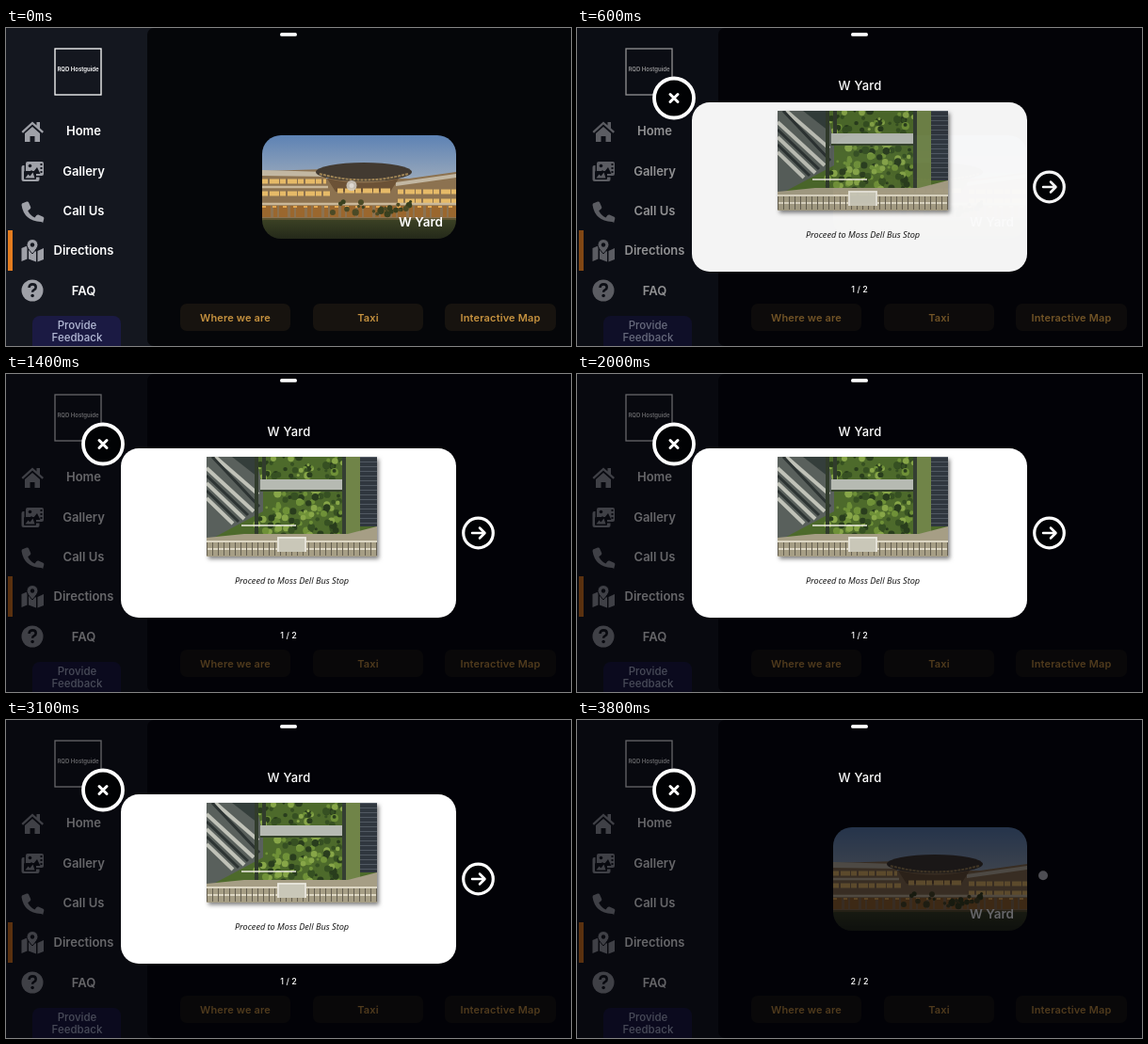
Animation of 600x338 px, one loop 3900 ms. Source, as an HTML page:

```html
<!DOCTYPE html>
<html lang="en">
<head>
<meta charset="utf-8">
<title>Directions</title>
<style>
html, body { margin: 0; width: 100%; height: 100%; overflow: hidden; background: #050609; }
svg { display: block; width: 600px; height: 338px; }
text { font-family: Inter, "Open Sans", sans-serif; text-anchor: middle; fill: #fff; }
.nav text { font-size: 13px; font-weight: 600; }
.icons { fill: #9fa1a8; }
.hole { fill: #14171f; }
.feedback text { font-size: 11.5px; font-weight: 500; fill: #b4bad6; }
.tabs rect { fill: #17130f; }
.tabs text { font-size: 11px; font-weight: 600; letter-spacing: .15px; fill: #c6923f; }
.name { font-size: 13.5px; font-weight: 600; }
.title { font-size: 13px; font-weight: 500; letter-spacing: .2px; }
.count { font-size: 9px; font-weight: 500; }
.caption { font: italic 9.2px "Open Sans", "Noto Sans", sans-serif; fill: #111; }
.ring { fill: #010204; stroke: #fff; }
.glyph { fill: none; stroke: #fff; stroke-linecap: round; stroke-linejoin: round; }

.dim, .box, .slide, .first, .second, .tap, .tap2 { animation: 3.9s linear infinite both; }
.dim { animation-name: dim; }
.box { animation-name: box; }
.slide { animation-name: slide; }
.first { animation-name: first; }
.second { animation-name: second; }
.tap { animation-name: tap; }
.tap2 { animation-name: tap2; }
@keyframes dim { 0%, 11% { opacity: 0 } 15.38% { opacity: .72 } 20%, 100% { opacity: 1 } }
@keyframes box { 0%, 11% { opacity: 0 } 15.2%, 100% { opacity: 1 } }
@keyframes slide { 0%, 11% { opacity: 0 } 15.38% { opacity: .96 } 18%, 92.5% { opacity: 1 } 97.2%, 100% { opacity: 0 } }
@keyframes first { 0%, 94.8% { opacity: 1 } 94.81%, 100% { opacity: 0 } }
@keyframes second { 0%, 94.8% { opacity: 0 } 94.81%, 100% { opacity: 1 } }
@keyframes tap { 0%, 2.5% { opacity: .85 } 8%, 100% { opacity: 0 } }
@keyframes tap2 { 0%, 88% { opacity: 0 } 91%, 100% { opacity: 1 } }
</style>
</head>
<body>
<svg viewBox="0 0 600 338">
  <defs>
    <linearGradient id="sky" x2="0" y2="1">
      <stop stop-color="#5d82b4"/><stop offset="1" stop-color="#a9b3bd"/>
    </linearGradient>
    <linearGradient id="lawn" x2="0" y2="1">
      <stop stop-color="#3d4325"/><stop offset="1" stop-color="#24291a"/>
    </linearGradient>
    <clipPath id="photoClip"><rect x="272" y="114" width="206" height="110" rx="20"/></clipPath>
    <clipPath id="courtClip"><rect x="213" y="88" width="181" height="106"/></clipPath>
    <filter id="shadow" x="-10%" y="-10%" width="125%" height="130%">
      <feDropShadow dx="2" dy="2.5" stdDeviation="2" flood-opacity=".5"/>
    </filter>
  </defs>

  <rect width="600" height="338" fill="#14171f"/>
  <rect x="150" width="460" height="338" rx="7" fill="#050609"/>

  <rect x="52" y="22" width="49" height="49" fill="none" stroke="#fff" stroke-width="1.3"/>
  <text x="76.5" y="46" font-size="6" font-weight="600">RQD Hostguide</text>

  <rect x="2" y="215" width="5" height="43" fill="#e37c1f"/>
  <g class="icons">
    <path d="M16.5 110 28 99.5l4.500 4V100h3.500v6.500l4 3.500-1.500 1.800L28 102.600 18 111.800z"/>
    <path d="M20 112l8-7 8 7v9h-5.500v-6h-5v6H20z"/>
    <g>
      <rect x="16.500" y="146" width="19" height="17" rx="2"/>
      <rect class="hole" x="19.500" y="140.500" width="22" height="18" rx="2"/>
      <rect x="21" y="142" width="19" height="15" rx="2"/>
      <circle class="hole" cx="25.500" cy="146.500" r="1.800"/>
      <path class="hole" d="M23 155l4-4 2 2 4-5 3.500 7z"/>
      <path d="M37.500 144v11" stroke="#14171f" stroke-width="2" stroke-dasharray="2 2"/>
      <rect class="hole" x="19" y="152" width="13" height="9" rx="1"/>
      <path d="M20.500 159.500l3-4 2 2 3-4 2 6z"/>
    </g>
    <path d="M17 186.500l5-2q1.500-.4 2 .8l2.200 5q.4 1.200-.5 2l-2.500 2q2.500 5 7.300 7.300l2-2.500q.8-1 2-.5l5 2.200q1.100.6.800 2l-1.200 4.400Q38.700 206 37 206 19 205 16.500 188z"/>
    <path d="M16.500 234l6-2.500v14l-6 2.500zM24 234.500l8 3v11l-8-3zM33.500 237l6.500-3v12l-6.500 2.500z"/>
    <path d="M28 240q-6-6.500-6-9.500a6 6 0 0 1 12 0q0 3-6 9.500z" stroke="#14171f"/>
    <circle class="hole" cx="28" cy="230.500" r="2.200"/>
    <circle cx="28" cy="279" r="11.500"/>
    <path d="M24.500 276q.3-3.600 3.700-3.600 3.500 0 3.500 3 0 2-2 3-1.600.8-1.600 2.300" fill="none" stroke="#14171f" stroke-width="2.600"/>
    <circle class="hole" cx="28.100" cy="284.500" r="1.800"/>
  </g>
  <g class="nav">
    <text x="82.500" y="114">Home</text>
    <text x="82.500" y="156.500">Gallery</text>
    <text x="82.500" y="198.500">Call Us</text>
    <text x="82.500" y="241">Directions</text>
    <text x="82.500" y="283.500">FAQ</text>
  </g>
  <g class="feedback">
    <rect x="28" y="306" width="94" height="42" rx="8" fill="#1b1a43"/>
    <text x="75.500" y="319.500">Provide</text>
    <text x="75.500" y="332.500">Feedback</text>
  </g>

  <g clip-path="url(#photoClip)">
    <rect x="272" y="114" width="206" height="60" fill="url(#sky)"/>
    <path d="M272 152l68-2v10h88l50-7v52H272z" fill="#8c7250"/>
    <path d="M272 151l69 2v5l-69-1zM414 164l64-9v4l-64 9z" fill="#c2b7a2"/>
    <path d="M341 160q40 9 76 0l-9 14h-58z" fill="#6c5236"/>
    <ellipse cx="380" cy="153" rx="51" ry="10" fill="#423a31"/>
    <path d="M333 155q47 13 94 0" fill="none" stroke="#a08556" stroke-width="2" stroke-dasharray="3 1"/>
    <path d="M272 163h68M272 176h72M352 173h56M416 174h62M416 184h62" stroke="#e6ba68" stroke-width="5" stroke-dasharray="6 2 10 1"/>
    <path d="M272 169h70M272 187h206" stroke="#c9b799" stroke-width="2.500"/>
    <path d="M272 195h206" stroke="#9a672e" stroke-width="12" stroke-dasharray="9 3 4 2"/>
    <path d="M272 190h206" stroke="#e3a750" stroke-width="2" stroke-dasharray="4 7"/>
    <g id="trees" fill="#39401f"></g>
    <rect x="272" y="202" width="206" height="22" fill="url(#lawn)"/>
    <path d="M272 203h206" stroke="#695a35" stroke-width="1.500"/>
  </g>
  <text class="name" x="440.500" y="211">W Yard</text>

  <g class="tabs">
    <rect x="185" y="293" width="117" height="29" rx="7"/><text x="243.500" y="312">Where we are</text>
    <rect x="326" y="293" width="117" height="29" rx="7"/><text x="384.500" y="312">Taxi</text>
    <rect x="466" y="293" width="118" height="29" rx="7"/><text x="525" y="312">Interactive Map</text>
  </g>
  <g class="tap">
    <circle cx="367" cy="167.500" r="5.500" fill="#d2cdc4"/>
    <circle cx="367" cy="167.500" r="2.500" fill="#f4f2ee"/>
  </g>

  <rect class="dim" width="600" height="338" fill="#000005" fill-opacity=".6"/>

  <g class="slide">
    <rect x="122" y="79" width="356" height="180" rx="19" fill="#fff"/>
    <rect x="213" y="88" width="181" height="106" fill="#566b3a" filter="url(#shadow)"/>
    <g clip-path="url(#courtClip)">
      <rect x="213" y="88" width="181" height="106" fill="#4d6a2b"/>
      <g id="leaves"></g>
      <path d="M213 88h52l8 34v24l-60 32z" fill="#59605c"/>
      <path d="M213 100l50 46M213 116l40 38M213 132l28 27M222 88l46 40" stroke="#c0c2b8" stroke-width="4"/>
      <path d="M219 88l50 53M213 108l44 42M213 124l34 33" stroke="#2d3433" stroke-width="3"/>
      <path d="M240 88h28v22z" fill="#343e3b"/>
      <path d="M266 88v84M274 88v24" stroke="#313c2c" stroke-width="4"/>
      <path d="M270 112h88v11h-88z" fill="#b6bab2"/>
      <path d="M270 124h88" stroke="#35432b" stroke-width="2"/>
      <path d="M358 88h18v86h-18z" fill="#708448"/>
      <path d="M359 88v86" stroke="#343e32" stroke-width="4"/>
      <path d="M376 88h18v74h-18z" fill="#30373f"/>
      <path d="M385 88v74" stroke="#515962" stroke-width="18" stroke-dasharray="1 4"/>
      <path d="M213 174l40-4h110l31-8v32H213z" fill="#a69e85"/>
      <path d="M213 178h181M213 186h181" stroke="#dcd6c3" stroke-width="2"/>
      <path d="M213 186h181" stroke="#655f50" stroke-width="14" stroke-dasharray="1 5"/>
      <path d="M288 173h31v16h-31z" fill="#c9c7b8"/>
      <path d="M289 189v-15h29v15M250 161h58" fill="none" stroke="#eeece2" stroke-width="1.500"/>
    </g>
    <text class="caption" x="303.500" y="222.500">Proceed to Moss Dell Bus Stop</text>
    <circle class="ring" cx="501.500" cy="169" r="15.800" stroke-width="3.200"/>
    <path class="glyph" d="M495 169h13M503 163.500l5.500 5.500-5.500 5.500" stroke-width="2.500"/>
  </g>

  <g class="box">
    <text class="title" x="300.500" y="65.500">W Yard</text>
    <circle class="ring" cx="103" cy="74.500" r="21" stroke-width="3.800"/>
    <path class="glyph" d="M99 70.500l8 8m0-8l-8 8" stroke-width="3"/>
    <text class="count first" x="300" y="280.500">1 / 2</text>
    <text class="count second" x="300" y="280.500">2 / 2</text>
  </g>
  <circle class="tap2" cx="495" cy="165.300" r="5" fill="#77777c" fill-opacity=".65"/>
  <rect x="291" y="5" width="18" height="3.800" rx="1.900" fill="#fff"/>
</svg>
<script>
let seed = 7;
const rand = () => (seed = seed * 16807 % 2147483647) / 2147483647;

function scatter(id, count, x, y, w, h, size, colors) {
  const group = document.getElementById(id);
  for (let i = 0; i < count; i++) {
    const dot = document.createElementNS(group.namespaceURI, 'circle');
    dot.setAttribute('cx', x + rand() * w);
    dot.setAttribute('cy', y + rand() * h);
    dot.setAttribute('r', size * (.5 + rand()));
    dot.setAttribute('fill', colors[i % colors.length]);
    group.append(dot);
  }
}

scatter('leaves', 170, 266, 88, 92, 86, 2.8, ['#365022', '#6f9138', '#87a648', '#293d1d']);
scatter('trees', 26, 345, 184, 85, 14, 2.6, ['#39401f', '#4b4a26']);
</script>
</body>
</html>
```
